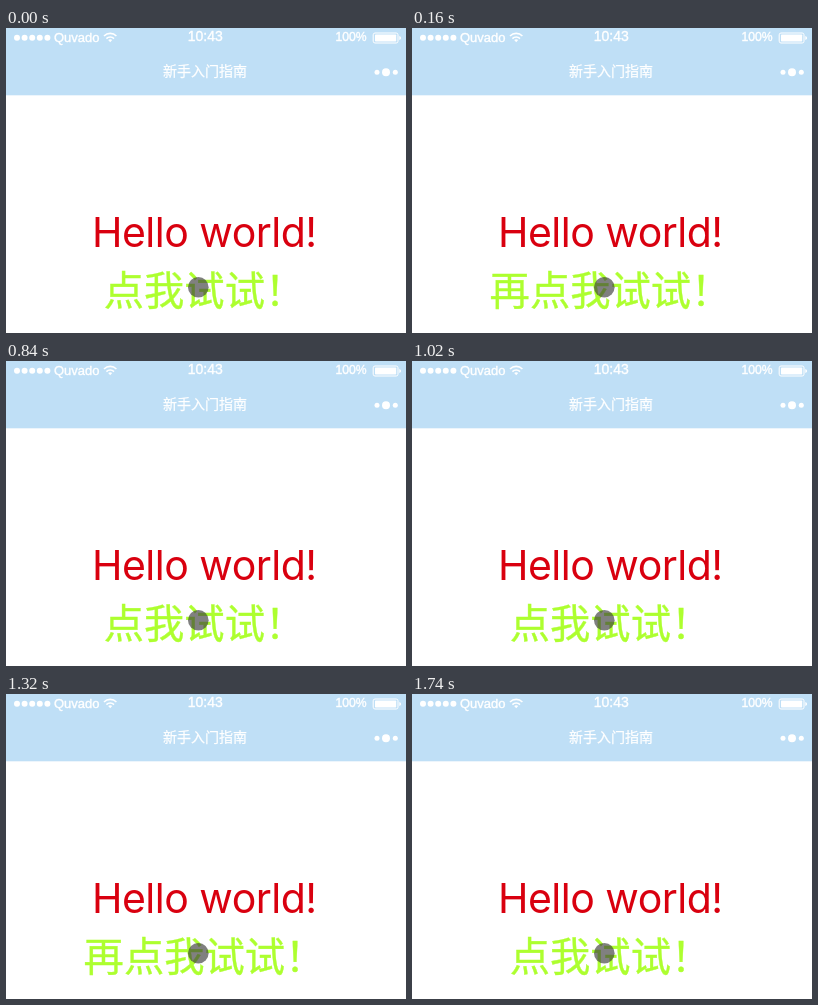
These frames come from a looping animation (400x305 px, 1.76 s). An HTML page:

```html
<!DOCTYPE html>
<html lang="zh-CN">
<head>
<meta charset="utf-8">
<style>
html, body { margin: 0; width: 100%; height: 100%; overflow: hidden; background: #fff; }
svg { display: block; }
.status { font-family: "Liberation Sans", Arial, sans-serif; fill: #fff; stroke: #fff; stroke-width: .4; }
.cjk { font-family: "Noto Sans CJK SC", "Noto Sans CJK", sans-serif; text-anchor: middle; }
.title { font-size: 14px; fill: #fff; stroke: #fff; stroke-width: .25; }
.hello { font: 41px Inter, sans-serif; letter-spacing: -.5px; fill: #d9000f; }
#label { font-size: 40.3px; fill: #adff2f; stroke: #adff2f; stroke-width: .4; }
</style>
</head>
<body>
<svg width="400" height="305" viewBox="0 0 400 305">
  <rect width="400" height="67.3" fill="#bfdff6"/>

  <!-- status bar -->
  <path d="M11 9.7h31" stroke="#fff" stroke-width="6" stroke-linecap="round" stroke-dasharray="0 7.6"/>
  <g class="status">
    <text x="48" y="13.7" font-size="13">Quvado</text>
    <text x="199.3" y="13" font-size="14" text-anchor="middle">10:43</text>
    <text x="329.5" y="13" font-size="12.2">100%</text>
  </g>
  <g fill="none" stroke="#fff" stroke-width="1.6">
    <path d="M98 8a8.7 8.7 0 0 1 12.4 0M100.4 10.6a5.3 5.3 0 0 1 7.6 0"/>
    <path d="M104.2 14.3l-2-2.2a2.9 2.9 0 0 1 4 0z" fill="#fff" stroke="none"/>
    <rect x="367.2" y="5" width="24.8" height="10" rx="1.8" stroke-width="1"/>
  </g>
  <rect x="369" y="6.6" width="21.2" height="6.8" rx=".7" fill="#fff"/>
  <path d="M393.3 8q1.8 .4 1.8 2t-1.8 2z" fill="#fff"/>

  <!-- title bar -->
  <text class="cjk title" x="199" y="48">新手入门指南</text>
  <g fill="#fff">
    <circle cx="371" cy="44.2" r="2.5"/>
    <circle cx="380" cy="44.2" r="4"/>
    <circle cx="389.3" cy="44.2" r="2.5"/>
  </g>

  <!-- page -->
  <text class="hello" x="86" y="219">Hello world!</text>
  <text id="label" class="cjk" x="198.5" y="276.8">点我试试！</text>
  <circle cx="192.3" cy="259.3" r="10.3" fill="#3c3c3c" fill-opacity=".65"/>
</svg>
<script>
const label = document.getElementById('label');
const start = performance.now();

function draw() {
  const t = (performance.now() - start) % 1760;
  const tapped = (t >= 20 && t < 680) || (t >= 1200 && t < 1720);
  const text = tapped ? '再点我试试！' : '点我试试！';
  if (label.textContent !== text) label.textContent = text;
  requestAnimationFrame(draw);
}
draw();
</script>
</body>
</html>
```
